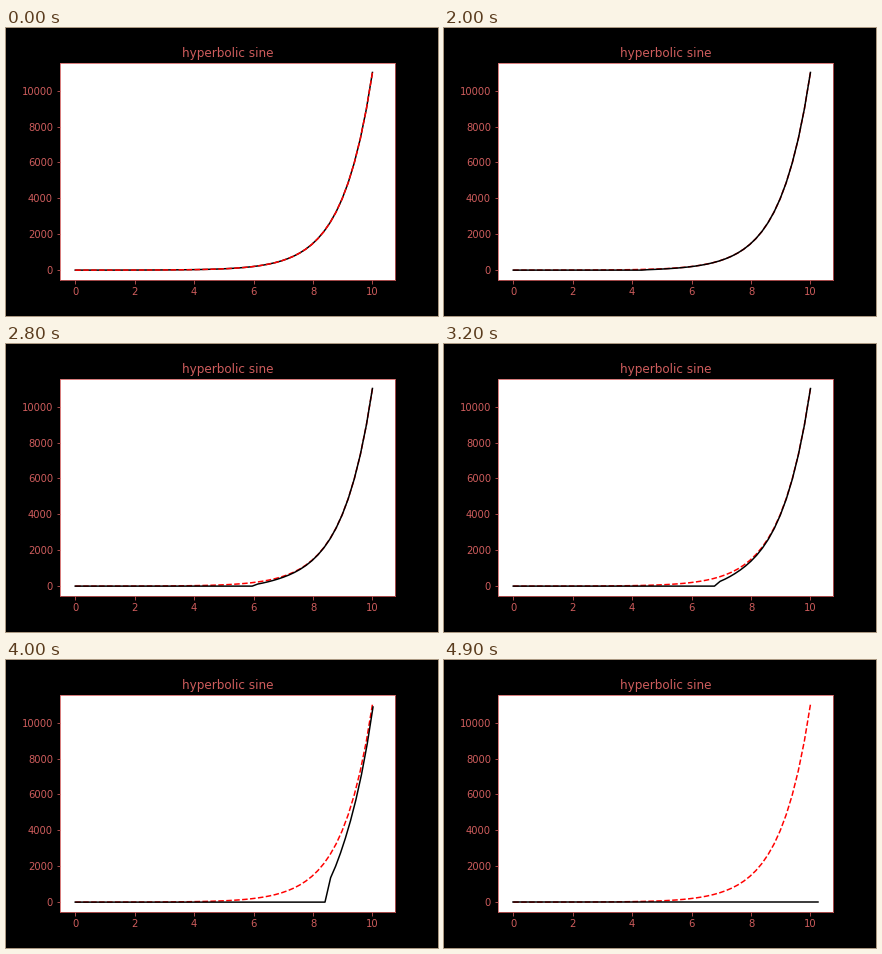
Write a matplotlib script that moves like this. It is 432x288 px and loops after 5 s.

```python
import numpy as np
import matplotlib.pyplot as plt
from matplotlib.animation import FuncAnimation

FRAMES = 50
INK = "indianred"
PUSH = 0.24  # sideways shift of the flattened part

x = np.linspace(0, 10, FRAMES)
y = np.sinh(x)
index = np.arange(FRAMES)

plt.rcParams.update({"font.family": "DejaVu Sans", "font.size": 10})
fig, ax = plt.subplots(figsize=(6, 4), dpi=72, facecolor="black")
fig.subplots_adjust(left=0.125, right=0.9, bottom=0.125, top=0.88)

ax.set_facecolor("white")
ax.set_title("hyperbolic sine", color=INK, fontsize=12)
ax.tick_params(colors=INK)
for spine in ax.spines.values():
    spine.set_color(INK)

x_pad = 0.05 * (x[-1] + PUSH)
y_pad = 0.05 * y[-1]
ax.set_xlim(-x_pad, x[-1] + PUSH + x_pad)
ax.set_ylim(-y_pad, y[-1] + y_pad)

curve, = ax.plot(x, y, "--", color="red", lw=1.5)
string, = ax.plot(x, y, "-", color="black", lw=1.5)


def pressed(k):
    """Curve with points up to k laid flat and the rest dragged along."""
    ahead = np.maximum(index - k, 0)
    shift = PUSH / np.cosh(ahead / 2.8)
    shift[0] = 0
    drop = np.where(ahead > 0, 0.56 * 0.657 ** ahead, 1)
    return x + shift, y * (1 - drop)


def update(k):
    string.set_data(*pressed(k))
    # The dashes lie on top only at the start of the loop.
    curve.set_zorder(3 if k == 0 else 2)
    return curve, string


anim = FuncAnimation(fig, update, frames=FRAMES, interval=100,
                     init_func=lambda: update(0), repeat=True,
                     repeat_delay=0, blit=False)
plt.show()
```
